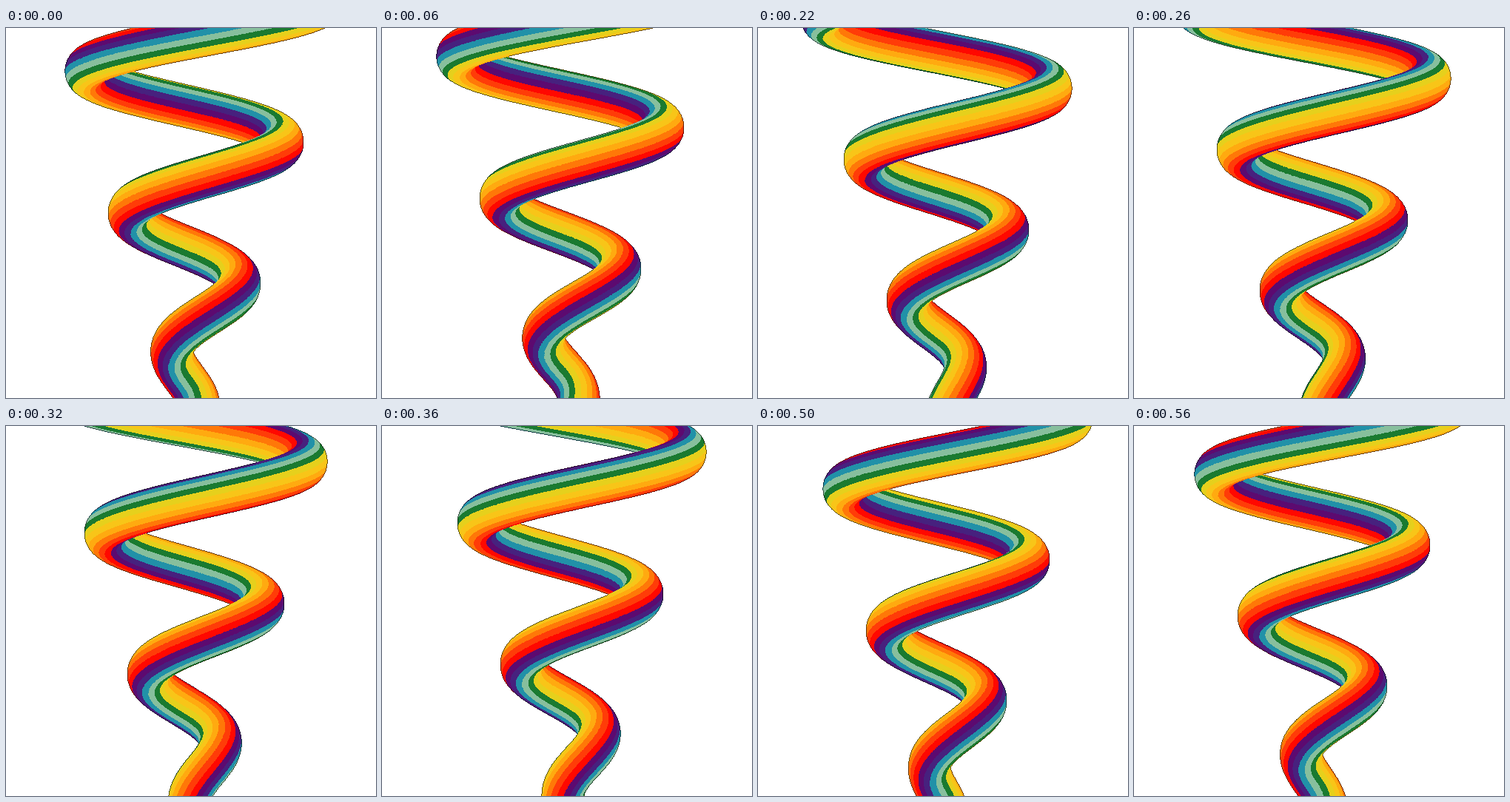
An HTML page with a canvas that plays this animation: 500 by 500 pixels, repeating every 0.58 s.

```html
<!DOCTYPE html>
<html lang="en">
<head>
<meta charset="utf-8">
<title>Rainbow helix</title>
<style>
html, body { margin: 0; width: 100%; height: 100%; overflow: hidden; background: #fff; }
canvas { display: block; }
</style>
</head>
<body>
<canvas id="stage" width="500" height="500"></canvas>
<script>
const SIZE = 500, CENTER = 255.5;
const STEPS = 29, STEP_MS = 20;
const TUBE = 28.5;               // tube radius
const RISE = 96.5 / Math.PI;     // height gained per radian
const TAPER = 0.3025;            // helix radius lost per pixel of height
const SIDES = 400, SPACING = 0.4;
const COLORS = [
  0x5c0a70, 0x47217e, 0x2191a8, 0x87bf9d, 0x1a7a30, 0xe6d01c,
  0xf8c518, 0xffaa10, 0xff7808, 0xff3c08, 0xff0800
];
const HUES = COLORS.length;
const REPEATS = 2;               // rainbows around the tube
const FIRST_STRIPE = 4;          // stripe facing outward at the top end

const ctx = document.getElementById('stage').getContext('2d');
const pack = (rgb, k = 1) =>
  (255 << 24 | (rgb & 255) * k << 16 | (rgb >> 8 & 255) * k << 8 | (rgb >> 16) * k) >>> 0;
const fills = COLORS.map(c => pack(c));
const rims = COLORS.map(c => pack(c, 0.4));

const dot = (a, b) => a[0] * b[0] + a[1] * b[1] + a[2] * b[2];
const cross = (a, b) => [
  a[1] * b[2] - a[2] * b[1],
  a[2] * b[0] - a[0] * b[2],
  a[0] * b[1] - a[1] * b[0]
];
const unit = a => a.map(v => v / Math.hypot(...a));

// Sweep a circle down the conical helix without twisting it
function buildTube() {
  const circle = Array.from({ length: SIDES }, (_, s) => {
    const a = s / SIDES * 2 * Math.PI;
    return [TUBE * Math.cos(a), TUBE * Math.sin(a)];
  });
  const xs = [], ys = [], zs = [];
  let normal;
  for (let y = -65; y < 540;) {
    const radius = 165 - TAPER * y, theta = (y - 60.2) / RISE;
    const cos = Math.cos(theta), sin = Math.sin(theta), shrink = TAPER * RISE;
    const slope = [shrink * cos + radius * sin, RISE, shrink * sin - radius * cos];
    const tangent = unit(slope);
    normal ||= [-cos, 0, -sin];
    const lean = dot(normal, tangent);
    normal = unit(normal.map((v, i) => v - lean * tangent[i]));
    const side = cross(tangent, normal);
    for (const [u, v] of circle) {
      xs.push(-radius * cos + u * normal[0] + v * side[0]);
      ys.push(y + u * normal[1] + v * side[1]);
      zs.push(-radius * sin + u * normal[2] + v * side[2]);
    }
    y += SPACING * RISE / Math.hypot(...slope);
  }
  return [xs, ys, zs].map(list => Float32Array.from(list));
}

const [xs, ys, zs] = buildTube();
const depth = new Float32Array(SIZE * SIZE);
const hit = new Int32Array(SIZE * SIZE);

// The helix makes one turn per loop while its tube rolls by one rainbow
function render(step) {
  const part = step / STEPS, turn = part * 2 * Math.PI;
  const cos = Math.cos(turn), sin = Math.sin(turn);
  depth.fill(-1e9);
  hit.fill(-1);
  for (let i = 0; i < xs.length; i++) {
    const py = Math.floor(ys[i]);
    if (py < 0 || py >= SIZE) continue;
    const px = Math.floor(CENTER + xs[i] * cos - zs[i] * sin);
    if (px < 0 || px >= SIZE) continue;
    const z = xs[i] * sin + zs[i] * cos, p = py * SIZE + px;
    if (z > depth[p]) {
      depth[p] = z;
      hit[p] = i % SIDES;
    }
  }
  const stripe = side => {
    const place = FIRST_STRIPE + 0.5 + HUES * (REPEATS * side / SIDES + 1 - part);
    return Math.floor(place) % HUES;
  };
  const image = new ImageData(SIZE, SIZE);
  const pixels = new Uint32Array(image.data.buffer);
  const empty = p => hit[p] === -1;
  for (let p = 0; p < pixels.length; p++) {
    if (empty(p)) {
      pixels[p] = 0xffffffff;
    } else {
      const rim = empty(p - 1) || empty(p + 1) || empty(p - SIZE) || empty(p + SIZE);
      pixels[p] = (rim ? rims : fills)[stripe(hit[p])];
    }
  }
  return image;
}

const cache = [];
let shown = -1;
function draw() {
  const step = Math.floor(performance.now() / STEP_MS) % STEPS;
  if (step !== shown) {
    cache[step] ||= render(step);
    ctx.putImageData(cache[step], 0, 0);
    shown = step;
  }
  requestAnimationFrame(draw);
}
draw();
</script>
</body>
</html>
```
